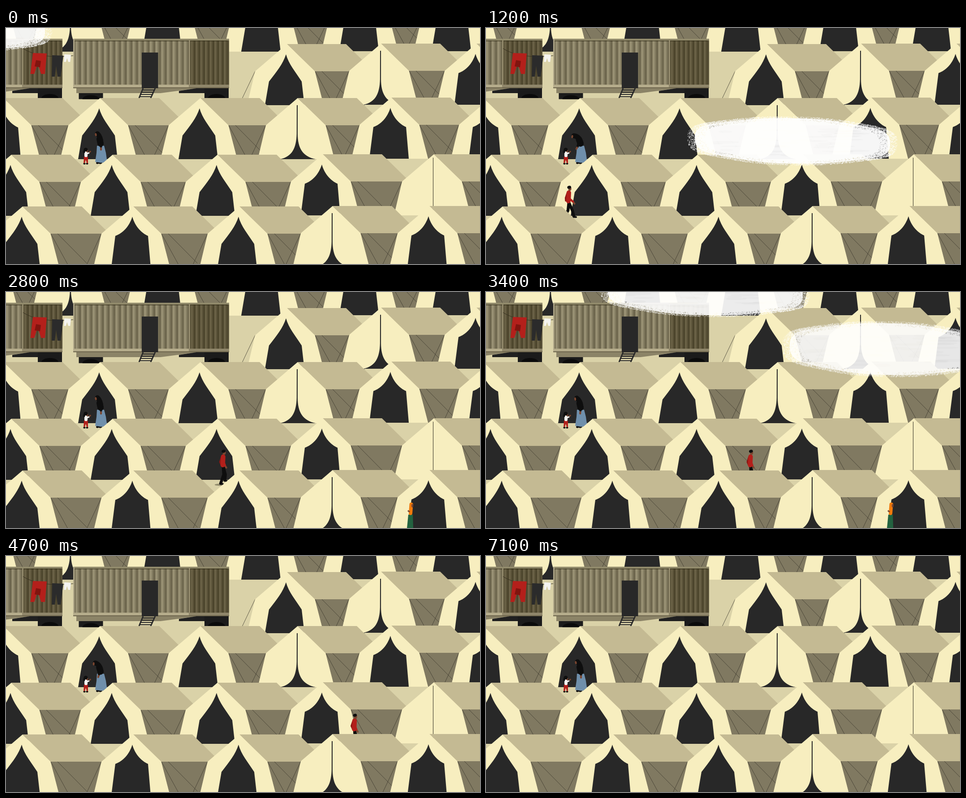
Animation, 1058 px wide and 529 px high, one loop 7.4 s. Source, as an HTML page with a canvas:

```html
<!DOCTYPE html>
<html lang="en">
<head>
<meta charset="utf-8">
<title>Camp</title>
<style>
html, body { margin: 0; width: 100%; height: 100%; overflow: hidden; background: #dad2a8; }
canvas { display: block; }
</style>
</head>
<body>
<canvas id="stage" width="1058" height="529"></canvas>
<script>
const W = 1058, H = 529, LOOP = 7400, TURN = Math.PI * 2;
const INK = '#282828', CREAM = '#f7eebf', ROOF = '#c4ba93', WALL = '#807961', GROUND = '#dad2a8',
      ROPE = '#3b382d', RED = '#b3201b', SKIN = '#7a4630', BLACK = '#0e0e0e', WHITE = '#f5f4f0';
const stage = document.getElementById('stage').getContext('2d');
let g = stage;

// ---- helpers
function layer(w, h, paint) {
  const c = document.createElement('canvas');
  c.width = w; c.height = h;
  g = c.getContext('2d');
  paint();
  g = stage;
  return c;
}
function trace(p) {
  g.beginPath();
  for (let i = 0; i < p.length; i += 2) g.lineTo(p[i], p[i + 1]);
}
function poly(color, ...p) {
  trace(p);
  g.fillStyle = color;
  g.fill();
}
function line(color, width, ...p) {
  trace(p);
  g.strokeStyle = color;
  g.lineWidth = width;
  g.stroke();
}
function bend(color, width, x0, y0, cx, cy, x1, y1) {
  g.beginPath();
  g.moveTo(x0, y0);
  g.quadraticCurveTo(cx, cy, x1, y1);
  g.strokeStyle = color;
  g.lineWidth = width;
  g.stroke();
}
function rect(color, x, y, w, h) { g.fillStyle = color; g.fillRect(x, y, w, h); }
function oval(color, x, y, rx, ry = rx, tilt = 0) {
  g.beginPath();
  g.ellipse(x, y, rx, ry, tilt, 0, TURN);
  g.fillStyle = color;
  g.fill();
}
function at(dx, dy, paint) {
  g.save();
  g.translate(dx, dy);
  g.lineCap = g.lineJoin = 'round';
  paint();
  g.restore();
}
const mix = (a, b, k) => a + (b - a) * k;
function seeded(s) {
  return () => (s = (s * 16807) % 2147483647) / 2147483647;
}

// ---- tents: a = tall door, b = wide door, c = shut with a flare, p = thin seam
function door(kind) {
  if (kind === 'p') return line('#4a4636', 1.2, -1.5, 8, -1.5, 137);
  g.fillStyle = INK;
  g.beginPath();
  if (kind === 'c') {
    g.moveTo(-2, 16);
    g.lineTo(-2.2, 80);
    g.bezierCurveTo(-3, 112, -12, 131, -39, 137);
    g.lineTo(40, 137);
    g.bezierCurveTo(11, 131, 0, 112, 0, 80);
    g.lineTo(0, 16);
  } else {
    const knee = kind === 'a' ? 84 : 66, mid = kind === 'a' ? 62 : 60;
    g.moveTo(-2, 23);
    g.bezierCurveTo(-9, 45, -23, mid, -40, knee);
    g.lineTo(-49, 137);
    g.lineTo(39, 137);
    g.lineTo(33, knee);
    g.bezierCurveTo(19, mid, 4, 45, -2, 23);
  }
  g.fill();
}
function tent(x, y, kind) {
  at(x, y, () => {
    poly(WALL, 62, 61, 193, 61, 174, 137, 82, 137);
    line(ROPE, .8, 78, 61, 143, 127);
    line(ROPE, .8, 63, 61, 103, 134);
    poly(ROOF, 0, 0, 132, 0, 194, 61, 62, 61);
    line(ROPE, .8, -71, 61, -107, 137);
    poly(CREAM, 0, 0, 62.5, 61, 82, 137, -89, 137, -71, 61);
    door(kind);
  });
}
// the rows rise by a hair towards the right
const row = (y, kinds, ...xs) =>
  xs.forEach((x, i) => tent(x, Math.round(y - x / 1350), kinds[i]));

// ---- containers
function ribs(x, w, count, dark, light) {
  const step = w / count;
  for (let i = 0; i < count; i++) {
    const x0 = x + i * step, grad = g.createLinearGradient(x0, 0, x0 + step, 0);
    grad.addColorStop(0, dark);
    grad.addColorStop(.3, light);
    grad.addColorStop(1, dark);
    rect(grad, x0, 28, step + .5, 99);
  }
}
function wheel(x, top, bottom) {
  rect('#1b1b1b', x, top, 54, bottom - top);
  g.beginPath();
  g.ellipse(x + 27, bottom, 19, 9, 0, Math.PI, TURN);
  g.fillStyle = '#0b0b0b';
  g.fill();
}
function container() {
  poly('#8b8367', 157, 135, 157, 146, 345, 146, 428, 135);
  wheel(162.5, 146, 159.5);
  poly('#202020', 425, 135, 497, 135, 497, 146, 386, 146, 386, 141);
  wheel(443, 135, 157);
  ribs(153, 255, 20, '#665f47', '#a0987a');
  ribs(411, 84, 8, '#474028', '#70674b');
  rect('rgba(50,44,25,.55)', 153, 28, 342, 2);
  rect('#918a6b', 150, 24, 348, 4);
  rect('#aea587', 150, 24, 3, 111);
  rect('#958c6e', 408, 28, 3, 107);
  rect('#5c543b', 495, 28, 3, 107);
  rect('#b5ac8b', 150, 127, 258, 6);
  rect('#8f866a', 408, 127, 90, 6);
  rect('#6d654c', 150, 133, 348, 2);
  rect(INK, 303, 55, 36.5, 80);
  line(INK, 3, 306, 135, 297, 157);
  line(INK, 3, 333, 135, 323, 157);
  for (let i = 0; i < 4; i++)
    line(INK, 2, 305 - i * 2.2, 139 + i * 5, 331 - i * 2.2, 139 + i * 5);
}
// left and right: where the legs end, as parts of the waist
function trousers(color, x, y, w, h, left, right) {
  const leg = .14, px = k => x + k * w;
  poly(color, x, y, px(1), y + 1, px(right + leg), y + h, px(right - leg), y + h,
    px((left + right) / 2), y + h * .5, px(left + leg), y + h, px(left - leg), y + h);
}
function laundry() {
  bend('#35301f', 1, 38, 46, 75, 70, 150, 62);
  trousers(RED, 60, 56, 31, 47, -.04, .73);
  poly('#80150f', 67, 72, 78, 74, 76, 88, 64, 86);
  trousers('#2b2b2b', 103, 61, 25, 48, .1, .62);
  trousers(WHITE, 130, 59, 15, 17, .1, .74);
}

// ---- people
function mother(bow) {
  const hx = mix(204, 188, bow), hy = mix(237, 246, bow);
  oval(BLACK, 205, 302, 4, 2.5, -.3);
  oval(BLACK, 211, 302, 4, 2.5, -.3);
  poly('#6f8fab', 203, 264, 219, 264, 223, 280, 226, 301, 212, 302, 199, 300, 202, 280);
  at(0, 0, () => {
    line(BLACK, 14, 211, 259, mix(209, 206, bow), mix(249, 251, bow));
    bend(BLACK, 11, 212, 258, mix(211, 207, bow), 243, hx, hy);
    line(BLACK, 5, mix(211, 203, bow), 255, mix(212, 197, bow), 266);
  });
  oval(SKIN, hx - 3.5, hy + 2, 2, 3.6, mix(-.2, .5, bow));
  oval(SKIN, mix(212, 193, bow), mix(271, 268, bow), 2.2, 3.8, bow * .8);
}
function child() {
  oval(BLACK, 175, 304, 2.6, 2);
  oval(BLACK, 181, 304, 2.6, 2);
  trousers(RED, 174, 288, 9, 15, .05, .85);
  at(0, 0, () => {
    line(WHITE, 7, 178.5, 280, 178.5, 286);
    line(WHITE, 3, 180, 282, 185, 280);
  });
  oval(SKIN, 187.5, 277.5, 2.6, 1.8, -.6);
  oval(SKIN, 181, 275, 2.3, 3.4);
  oval(BLACK, 178, 272.5, 4.5, 4);
  oval(BLACK, 174.5, 277, 2, 3.5);
}
const STRIDE = 5; // steps of time in one walk cycle
function walker(n) {
  const phase = (n - 8) / STRIDE * TURN, swing = Math.cos(phase), lift = Math.sin(phase);
  const x = -45 + 37.5 * n + 6 * Math.sin(2 * phase - .3);
  const leg = (s, up) => {
    const foot = s * 15 - 1, y = 429 - Math.max(0, up) * 6 - Math.max(0, s) * 4;
    line(BLACK, 6.5, 0, 391, s * 6 + 3, 409, foot, y);
    line(BLACK, 4, foot, y + 1, foot + 5, y + 1.5);
  };
  at(x, 0, () => {
    oval('rgba(60,55,38,.45)', -6, 432, 13, 2.6);
    leg(swing, lift);
    leg(-swing, -lift);
    line('#8e1814', 4, -3, 369, -7, 381, -5 + swing * 2, 387);
    line(RED, 10, 0, 369, -1, 388);
    const hand = 7 - swing * 5;
    line(RED, 4.5, 2, 369, 2, 383, hand - 1, 390);
    oval(SKIN, hand + 1, 393, 2.2, 3, -.6);
    line(SKIN, 4, 1, 361, 1, 363);
    oval(SKIN, 2.5, 360, 3.2, 4.8);
    oval(BLACK, .8, 357, 4.4, 3.4, -.3);
  });
}
function visitor(n) {
  const nod = n % 2 * .6;
  poly('#23623f', 898, 499, 908, 499, 909, 529, 895, 529);
  at(0, 0, () => line('#f07a0c', 8, 904.5, 476, 903, 496));
  oval('#f07a0c', 905 + nod, 477, 3.6, 5);
  oval(SKIN, 907 + nod, 479, 2, 4);
  line(SKIN, 3, 897, 490, 901, 493);
}

// ---- dust cloud: a tilted, squared oval with a dry-brush rim
function rim(a, k) {
  const c = Math.cos(a), s = Math.sin(a), soft = v => Math.sign(v) * Math.abs(v) ** .78;
  return [236 + 232 * k * soft(c), 63 + 52 * k * soft(s) + 6 * c + 2 * Math.sin(5 * a)];
}
const cloud = layer(480, 130, () => {
  const rnd = seeded(91), fill = [];
  for (let a = 0; a < TURN; a += .05) fill.push(...rim(a, .94));
  poly('rgba(255,255,255,.98)', ...fill);
  const flecks = (count, from, to, alpha) => {
    for (let i = 0; i < count; i++) {
      const [x, y] = rim(rnd() * TURN, mix(from, to, rnd()));
      oval(`rgba(255,255,255,${alpha})`, x, y, .4 + rnd(), .3 + rnd() * .6);
    }
  };
  g.globalCompositeOperation = 'destination-out';
  flecks(1400, .84, .96, .3);
  for (let i = 0; i < 40; i++)
    oval('rgba(0,0,0,.025)', 50 + rnd() * 350, 30 + rnd() * 65, 12 + rnd() * 30, 1 + rnd() * 2);
  g.globalCompositeOperation = 'source-over';
  flecks(4500, .92, 1.01, .6);
});
function drift(x, y, alpha, tall = 1) {
  g.globalAlpha = alpha;
  g.drawImage(cloud, x, y, 480, 130 * tall);
  g.globalAlpha = 1;
}

// ---- still layers
const back = layer(W, H, () => {
  rect(GROUND, 0, 0, W, H);
  row(-84, 'acaaaa', -52, 145, 353, 574, 793, 999);
  row(36, 'acb', 627, 837, 1050);
  for (const dx of [-372, 0]) {
    g.save();
    g.translate(dx, 0);
    container();
    g.restore();
  }
  laundry();
  row(157, 'baacbb', -6, 210, 434, 651, 860, 1082);
});
const middle = layer(W, H, () => row(284, 'aaabp', 12, 238, 472, 707, 955));
const front = layer(W, H, () => row(400, 'abacb', 37, 284, 521, 729, 945));

// ---- motion, in steps
const bump = (n, mid, half) =>
  Math.abs(n - mid) < half ? Math.cos((n - mid) / half * Math.PI / 2) ** 2 : 0;

function draw(n) {
  g.drawImage(back, 0, 0);
  mother(bump(n, 8, 4) + .6 * bump(n, 20, 4));
  child();
  g.drawImage(middle, 0, 0);
  walker(n);
  g.drawImage(front, 0, 0);
  if (n >= 10 && n < 19) visitor(n);
  drift(-367 + 310 * n, -62, .93);
  drift(-367 + 310 * (n - 15), -62, .93);
  drift(-12 + 230 * (n - 4), 190, .98);
  drift(-30 - 230 * (n - 20), 56, .91, 1.14);
}

const stepAt = t => t < 3800 ? Math.floor(t / 200) : 19 + Math.floor((t - 3800) / 300);
const start = performance.now();
let shown = -1;
function tick() {
  const n = stepAt((performance.now() - start) % LOOP);
  if (n !== shown) draw(shown = n);
  requestAnimationFrame(tick);
}
tick();
</script>
</body>
</html>
```
